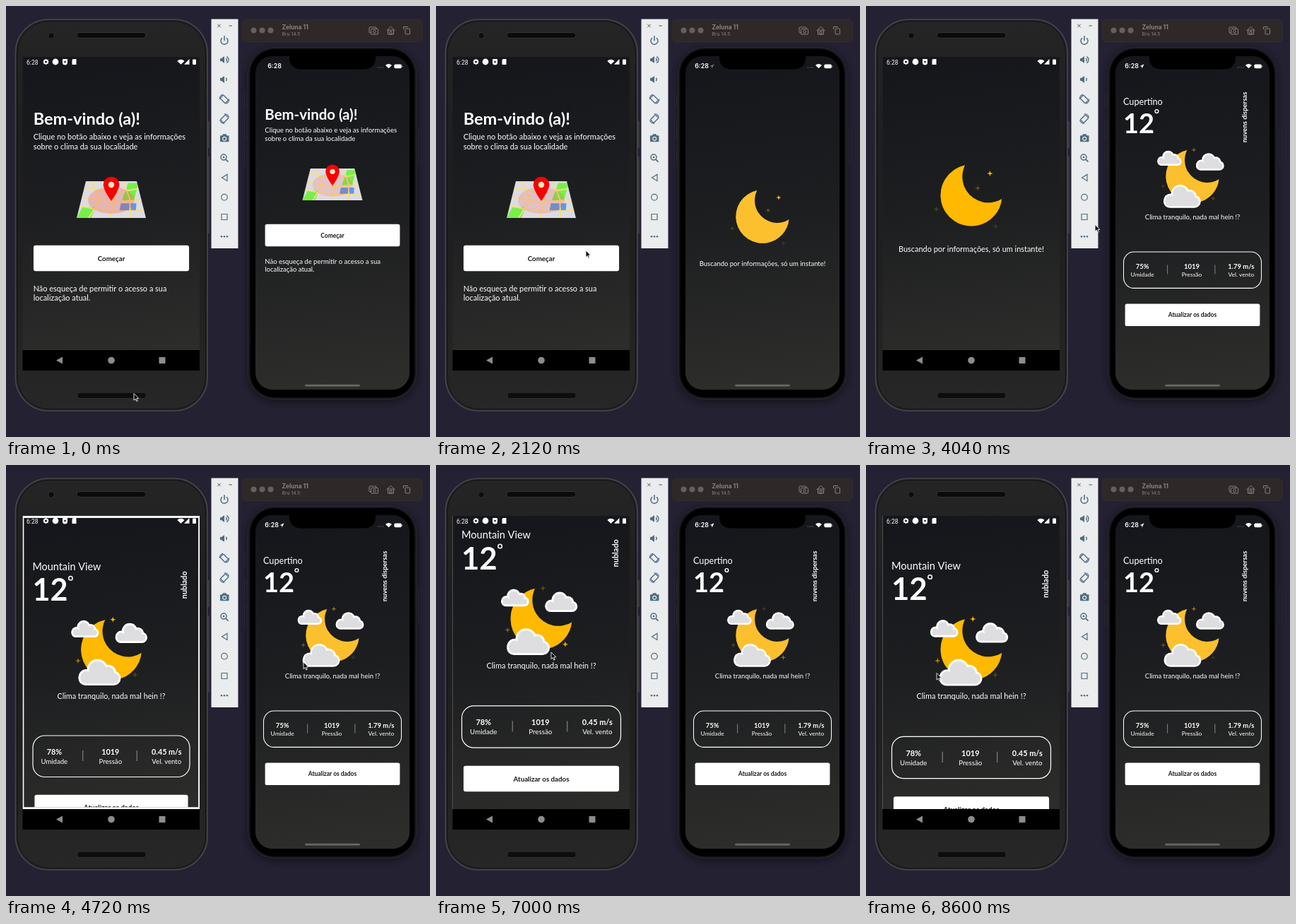
Write an HTML page with a canvas that moves like this. It is 600x610 px and loops after 8.64 s.

```html
<!DOCTYPE html>
<html lang="pt">
<head>
<meta charset="utf-8">
<title>Clima</title>
<style>
html, body { margin: 0; width: 100%; height: 100%; overflow: hidden; background: #232132; }
canvas { display: block; }
</style>
</head>
<body>
<canvas id="stage" width="600" height="610"></canvas>
<script>
const g = document.getElementById('stage').getContext('2d');
const LOOP = 8640, TAU = Math.PI * 2;

const span = (t, a, b) => Math.min(1, Math.max(0, (t - a) / (b - a)));
const smooth = p => p * p * (3 - 2 * p);
const easeOut = p => 1 - (1 - p) ** 3;
const move = (t, a, b) => smooth(span(t, a, b));
const pulse = (t, a, b, fade) => span(t, a, a + fade) * (1 - span(t, b, b + fade));
const wave = (t, peak, period) => Math.cos(TAU * (t - peak) / period);

function paint(fill, line, width = 1) {
  if (fill) { g.fillStyle = fill; g.fill(); }
  if (line) { g.strokeStyle = line; g.lineWidth = width; g.stroke(); }
}
function box(x, y, w, h, r, ...style) {
  g.beginPath(); g.roundRect(x, y, w, h, r); paint(...style);
}
function arc(x, y, r, a, b, ...style) {
  g.beginPath(); g.arc(x, y, r, a, b); paint(...style);
}
const dot = (x, y, r, ...style) => arc(x, y, r, 0, TAU, ...style);
function shape(points, fill, ...line) {
  g.beginPath();
  points.forEach(p => g.lineTo(...p));
  if (fill) g.closePath();
  paint(fill, ...line);
}
function text(s, x, y, size, { weight = 400, align = 'left', color = '#fff', face = 'Lato' } = {}) {
  g.font = `${weight} ${size}px ${face}, sans-serif`;
  g.textAlign = align;
  g.fillStyle = color;
  g.fillText(s, x, y);
}
function at(x, y, scale, draw) {
  g.save(); g.translate(x, y); g.scale(scale, scale); draw(); g.restore();
}
function faded(alpha, draw) {
  g.save(); g.globalAlpha *= alpha; draw(); g.restore();
}
function clip(x, y, w, h, r = 0) {
  g.beginPath(); g.roundRect(x, y, w, h, r); g.clip();
}

// Both devices share one layout in points; unit is pixels per point.
const android = {
  screen: [23.5, 72, 250.5, 415], cx: 149, unit: .608, mapY: 274, loadY: 268, moonY: 263.5,
  city: 'Mountain View', sky: 'nublado', skyX: 178.5, headDrop: 6,
  stats: ['78%', '1019', '0.45 m/s'], moonColor: '#ffb900', swayStart: 7000, glow: 1, mapDelay: 0
};
const phone = {
  screen: [353, 71, 218, 472], cx: 462, unit: .527, mapY: 252.5, loadY: 298, moonY: 241,
  city: 'Cupertino', sky: 'nuvens dispersas', skyX: 146.5, headDrop: 0,
  stats: ['75%', '1019', '1.79 m/s'], moonColor: '#fcc02e', swayStart: 4720, glow: .55, mapDelay: 160
};
const BOLD = { weight: 700 }, CENTER = { align: 'center' }, BOLD_CENTER = { ...BOLD, ...CENTER };

function backdrop([x, y, w, h]) {
  const fill = g.createLinearGradient(x, y, x + w * .25, y + h);
  ['#15161b', '#1d1e20', '#2d2d2b'].forEach((c, i) => fill.addColorStop(i / 2, c));
  g.fillStyle = fill;
  g.fillRect(x, y, w, h);
}

function button(y, label, alpha = 1) {
  faded(alpha, () => {
    box(-181, y, 362, 60, 5, '#fff');
    text(label, 0, y + 36, 16, { ...BOLD_CENTER, color: '#161616' });
  });
}

function map(t) {
  // u and v run from -1 to 1 over a sheet lying in perspective
  const spot = (u, v) => [u * (42.5 + 6.5 * v), 26 * v];
  const patch = (u, v, w, h, lean, color) =>
    shape([spot(u + lean, v), spot(u + w + lean, v), spot(u + w, v + h), spot(u, v + h)], color);
  g.save();
  shape([spot(-1, -1), spot(1, -1), spot(1, 1), spot(-1, 1)], '#dcdce1');
  g.clip();
  patch(.35, -.9, .4, .95, .3, '#78ef49');
  patch(-1, .4, .42, .6, .1, '#78ef49');
  patch(.25, .2, .5, .4, .06, '#5b9be6');
  for (let i = -1; i <= 1; i++) {
    shape([spot(i * .62 - .15, -1), spot(i * .5 + .12, 0), spot(i * .6 - .05, 1)], null, '#f8dc86', 2);
    shape([spot(-1, i * .5 - .15), spot(0, i * .5 + .15), spot(1, i * .6)], null, '#f8dc86', 2);
  }
  const p = (t + 900) % 2000, grow = easeOut(span(p, 0, 950));
  g.beginPath();
  g.ellipse(0, 1, 33 * grow, 19 * grow, 0, 0, TAU);
  paint(`rgba(255,70,60,${.42 * (1 - span(p, 650, 1300))})`);
  g.restore();
  g.beginPath();
  g.arc(0, -21, 11.3, Math.PI * .86, Math.PI * .14);
  g.quadraticCurveTo(8, -9, 0, 2);
  g.quadraticCurveTo(-8, -9, -10.2, -16);
  paint('#f50303');
  dot(0, -21, 4.2, '#f9e7bd');
}

function welcome(d, t, alpha) {
  at(d.cx, d.mapY, d.unit, () => {
    const left = -181.5;
    text('Bem-vindo (a)!', left, -174, 38.7, BOLD);
    text('Clique no botão abaixo e veja as informações', left, -139, 18);
    text('sobre o clima da sua localidade', left, -117, 18);
    at(0, 0, 1.645, () => map(t + d.mapDelay));
    button(106.5, 'Começar', alpha);
    text('Não esqueça de permitir o acesso a sua', left, 213, 18);
    text('localização atual.', left, 235, 18);
  });
}

function moon(color) {
  g.beginPath();
  g.arc(0, 0, 37.9, Math.atan2(-37, -8), Math.atan2(4, 38), true);
  g.arc(21, -23, 32, Math.atan2(27, 17), Math.atan2(-14, -29));
  paint(color);
}
function star(x, y, alpha, color) {
  const points = Array.from({ length: 8 }, (_, i) => {
    const a = i * TAU / 8, r = i % 2 ? 1.2 : 3.6;
    return [x + r * Math.cos(a), y + r * Math.sin(a)];
  });
  faded(alpha, () => shape(points, color));
}
function cloud(x, y, w) {
  const h = w * .62;
  const lobe = (cx, cy, r, grow) => dot(x + w * cx, y + h * cy, h * r + grow, g.fillStyle);
  [['#fff', 0], ['#dedee0', -2.5]].forEach(([color, grow]) => {
    box(x - grow, y + h * .45 - grow, w + 2 * grow, h * .55 + 2 * grow, h * .28 + grow, color);
    lobe(.45, .4, .4, grow);
    lobe(.7, .52, .31, grow);
    lobe(.19, .68, .3, grow);
  });
}

function loading(d, t) {
  at(d.cx, d.loadY, d.unit, () => {
    at(0, 0, 1.89, () => {
      moon(d.moonColor);
      [[23, -27], [8, -9], [-43, 17], [30, 38]].forEach(([x, y], i) =>
        star(x, y, (.8 + .2 * wave(t, 2120, 1900)) / (1 + 2 * i), d.moonColor));
    });
    text('Buscando por informações, só um instante!', 0, 132, 18, CENTER);
  });
}

function weatherArt(d, t) {
  const sway = -wave(t, d.swayStart, 3000);
  moon(d.moonColor);
  [[2, -37.5], [-41.5, 14], [29.5, 31.5]].forEach(([x, y], i) =>
    star(x, y, d.glow * (.62 + .38 * wave(t, 4720 + 980 * i, 3880)), d.moonColor));
  cloud(-50 - sway * .5, -36.5, 34.5);
  cloud(5 + sway * .4, -33, 40);
  cloud(-41 + sway * 1.5, 12, 53);
}

function weather(d, t) {
  at(d.cx, d.moonY, d.unit, () => {
    text(d.city, -186, -192.5 + d.headDrop, 24);
    text('12', -186, -115, 72, BOLD);
    dot(-96, -174.5 + d.headDrop, 4.6, null, '#fff', 2.5);
    g.save();
    g.translate(d.skyX, -158.5 + d.headDrop);
    g.rotate(-Math.PI / 2);
    text(d.sky, 0, 0, 18, BOLD_CENTER);
    g.restore();
    at(0, 0, 1.89, () => weatherArt(d, t));
    text('Clima tranquilo, nada mal hein !?', 0, 115.5, 18, CENTER);
    box(-185, 203, 370, 97.5, 28, null, '#fff', 2);
    ['Umidade', 'Pressão', 'Vel. vento'].forEach((label, i) => {
      const x = -134.5 + 132.5 * i;
      text(d.stats[i], x, 248, 18, BOLD_CENTER);
      text(label, x, 269.5, 16, CENTER);
      if (i) box(-195.5 + 127.5 * i, 238, 1.8, 25, 0, '#8a8a8a');
    });
    button(342.5, 'Atualizar os dados');
  });
}

function wifi(x, y, r) {
  g.beginPath(); g.moveTo(x, y); g.arc(x, y, r, -Math.PI * .76, -Math.PI * .24); paint('#fff');
}

function androidBody() {
  const metal = g.createLinearGradient(0, 18, 0, 573);
  ['#252526', '#1e1e20', '#202020', '#272727'].forEach((c, i) => metal.addColorStop(i / 3, c));
  box(284, 163, 4, 38, 1, '#3b3b40');
  box(284, 213, 4, 109, 1, '#3b3b40');
  box(13.5, 19, 271.5, 554, 47, metal, '#48484b', 1.6);
  box(16, 21.5, 266.5, 549, 45, null, '#111113');
  box(100, 37.5, 98, 8, 4, '#0b0b0c', '#343436');
  box(101, 547, 97, 8.5, 3, '#0d0d0d', '#303030');
  dot(64, 42, 4.2, '#0c0c0e', '#333338');
}

function androidStatus() {
  const y = 79;
  text('6:28', 29, 82.6, 8.6, { face: 'Roboto' });
  dot(56.5, y, 2.4, null, '#fff', 1.8);
  for (let a = 0; a < TAU; a += TAU / 8) dot(56.5 + 3.4 * Math.cos(a), y + 3.4 * Math.sin(a), .8, '#fff');
  dot(70, y, 4.4, '#fff');
  box(80, 75, 7, 8.5, [1, 1, 4, 4], '#fff');
  dot(83.5, y, 1.3, '#222');
  box(93.5, 75, 6, 8, [2, 0, 0, 0], '#fff');
  wifi(247.5, 82.8, 7);
  shape([[259.5, 75], [259.5, 82.8], [252, 82.8]], '#fff');
  box(264, 75.5, 5, 7.5, 1, '#fff');
}

function androidScreen(t) {
  const d = android, [x, y, w, h] = d.screen;
  const scroll = 2.5 * (1 - move(t, 5680, 5800)) + 46 * move(t, 6560, 6900) - 43.5 * move(t, 7060, 7360);
  const full = [x, y, w, h + 29];
  g.save();
  clip(...d.screen);
  if (t < 4500) {
    backdrop(full);
    if (t < 3280) welcome(d, t, 1 - .8 * pulse(t, 2660, 2980, 120));
    else loading(d, t);
  } else {
    const p = span(t, 4500, 4900), scale = .85 + .15 * easeOut(p), cy = y + h / 2;
    box(...d.screen, 0, '#fff');
    faded(1 - span(p, 0, .35), () => { backdrop(full); loading(d, t); });
    at(d.cx, cy, scale, () => {
      g.translate(-d.cx, -cy);
      clip(...d.screen);
      g.globalAlpha = span(p, 0, .35);
      backdrop(full);
      faded(pulse(t, 5720, 6250, 300), () => {
        g.beginPath(); g.ellipse(d.cx, 40, 150, 68, 0, 0, TAU); paint('#1c1c34');
      });
      g.translate(0, -scroll);
      weather(d, t);
    });
  }
  g.restore();
  androidStatus();
  const gray = '#8c8c8c';
  box(x, y + h, w, 29, 0, '#000');
  shape([[80, 496.5], [80, 506.5], [71, 501.5]], gray);
  dot(d.cx, 501.5, 4.8, gray);
  box(216.5, 497, 9, 9, .5, gray);
}

function toolbar() {
  const ink = '#4c6f80', paper = '#ebecee';
  const speaker = waves => {
    box(-6, -2, 4, 4, 0, ink);
    shape([[-4, -2], [0, -5], [0, 5], [-4, 2]], ink);
    for (let i = 0; i < waves; i++) arc(1, 0, 2.3 + i * 2.7, -1.1, 1.1, null, ink, 1.4);
  };
  const rotate = side => {
    g.rotate(side * Math.PI / 4);
    box(-5, -3, 10, 6.5, .8, null, ink, 1.4);
    [1, 3].forEach(k => arc(0, 0, 6.8, k * TAU / 4 - 2.4, k * TAU / 4 - 1.1, null, '#3d5f9a'));
  };
  const icons = [
    () => { arc(0, 1, 5, -.9, Math.PI + .9, null, ink, 1.5); box(-.8, -6, 1.6, 7, 0, ink); },
    () => speaker(2),
    () => speaker(1),
    () => rotate(1),
    () => rotate(-1),
    () => { box(-6, -4, 12.5, 9, 1, ink); box(-2.5, -6, 5.5, 4, 1, ink); dot(.2, .5, 2.5, null, paper, 1.2); },
    () => { dot(-1, -1, 4, null, ink, 1.5); shape([[2, 2], [5.5, 5.5]], null, ink, 1.8); dot(-1, -1, 1.4, ink); },
    () => shape([[4, -4.5], [4, 4.5], [-3.5, 0]], 'transparent', ink, 1.2),
    () => dot(0, 0, 4.3, null, ink, 1.2),
    () => box(-4, -4, 8, 8, 0, null, ink, 1.2),
    () => [-4, 0, 4].forEach(x => dot(x, 0, 1.3, ink))
  ];
  box(290.5, 18.5, 38, 324.5, 0, paper);
  [1, -1].forEach(k => shape([[299.3, 28 - 2.2 * k], [303.7, 28 + 2.2 * k]], null, '#555'));
  shape([[315.5, 28], [320, 28]], null, '#555');
  icons.forEach((icon, i) => at(309, 48.3 + 27.8 * i, 1, icon));
}

function titleBar(focused) {
  const ink = focused ? '#c9c5c5' : '#888282', paper = '#2f2829';
  const lights = focused ? ['#ee6a5f', '#f5bd4f', '#61c454'] : Array(3).fill('#655f60');
  box(334, 19, 255.5, 32, 6, paper, '#383133', .6);
  lights.forEach((c, i) => dot(350.5 + 12 * i, 34.5, 4, c));
  text('Zeluna 11', 390.5, 33.3, 8.4, { weight: 700, color: ink, face: 'Inter' });
  text('Bru 14.5', 390.5, 42, 6.8, { color: ink, face: 'Inter' });
  box(514, 30, 10, 8, 1, null, ink);
  box(516.5, 32.5, 10, 7.5, 1, paper, ink);
  dot(521.5, 36.3, 1.9, null, ink);
  box(540.5, 34, 8, 6, 0, null, ink);
  box(543, 36, 3, 4, 0, null, ink);
  shape([[538.5, 35], [544.5, 29.3], [550.5, 35]], null, ink);
  box(565, 32, 6.5, 8, 1, null, ink);
  shape([[569, 29.5], [562.5, 29.5], [562.5, 33]], null, ink);
}

function phoneBody() {
  const key = (x, y, h) => box(x, y, 3, h, 1, '#1c1b25', '#302f3c', .6);
  g.save();
  g.shadowColor = 'rgba(0,0,0,.45)'; g.shadowBlur = 12; g.shadowOffsetY = 3;
  box(342, 58, 239.5, 499, 38, '#15151a');
  g.restore();
  key(337.5, 126, 18);
  key(337.5, 161, 29);
  key(337.5, 198, 29);
  key(584.5, 173, 52);
  box(342.5, 58.5, 238.5, 498, 38, null, '#2c2c32');
  box(345.5, 61, 232.5, 493, 35, '#000');
}

function phoneStatus(t) {
  const located = t >= 1120;
  box(401, 60, 122, 29.5, [0, 0, 15, 15], '#000');
  text('6:28', located ? 376 : 380, 88.3, 8.8, { weight: 600, align: 'center', face: 'Inter' });
  if (located) shape([[393.5, 82.3], [390.6, 88.5], [390.2, 85.6], [387.3, 85.2]], t < 2500 ? '#777' : '#fff');
  for (let i = 0; i < 4; i++) dot(526 + i * 2.6, 87, .8, '#55565a');
  wifi(541.5, 88.3, 6.2);
  box(549.3, 82.5, 10.5, 5.8, 1.8, '#fff');
  box(560.4, 84.4, 1, 2, .5, '#aaa');
}

function phoneScreen(t) {
  const d = phone, w = d.screen[2];
  g.save();
  clip(...d.screen, 24);
  backdrop(d.screen);
  if (t < 1200) welcome(d, t, 1 - .8 * pulse(t, 880, 1060, 120));
  else {
    const slide = easeOut(span(t, 2320, 2760));
    if (slide < 1) at(-w * .3 * slide, 0, 1, () => loading(d, t));
    if (slide > 0) at(w * (1 - slide), 0, 1, () => { backdrop(d.screen); weather(d, t); });
  }
  phoneStatus(t);
  box(423, 535.7, 78, 2.8, 1.4, '#686868');
  g.restore();
}

function cursor(t) {
  let x = 181, y = 548.5;
  const glide = (from, to, nx, ny) => {
    const p = move(t, from, to);
    x += (nx - x) * p;
    y += (ny - y) * p;
  };
  glide(360, 820, 455, 329);
  glide(1360, 1980, 212, 346);
  glide(2200, 2640, 200, 348.5);
  glide(3500, 4500, 421, 279);
  glide(4900, 5560, 152, 278);
  glide(5680, 6040, 158, 334);
  glide(6560, 6900, 163, 265);
  glide(7060, 7360, 161, 309);
  glide(7500, 8240, 100, 294.5);
  at(x, y, 1, () => shape([[0, 0], [0, 9.6], [2.2, 7.6], [3.8, 11], [5.3, 10.3], [3.8, 7], [6.8, 6.8]],
    '#0a0a0a', '#f2f2f2', .9));
}

function frame(t) {
  g.fillStyle = '#232132';
  g.fillRect(0, 0, 600, 610);
  androidBody();
  androidScreen(t);
  toolbar();
  phoneBody();
  phoneScreen(t);
  titleBar(t >= 860 && t < 2080);
  cursor(t);
}

const start = performance.now();
function tick() {
  frame((performance.now() - start) % LOOP);
  requestAnimationFrame(tick);
}
tick();
</script>
</body>
</html>
```
